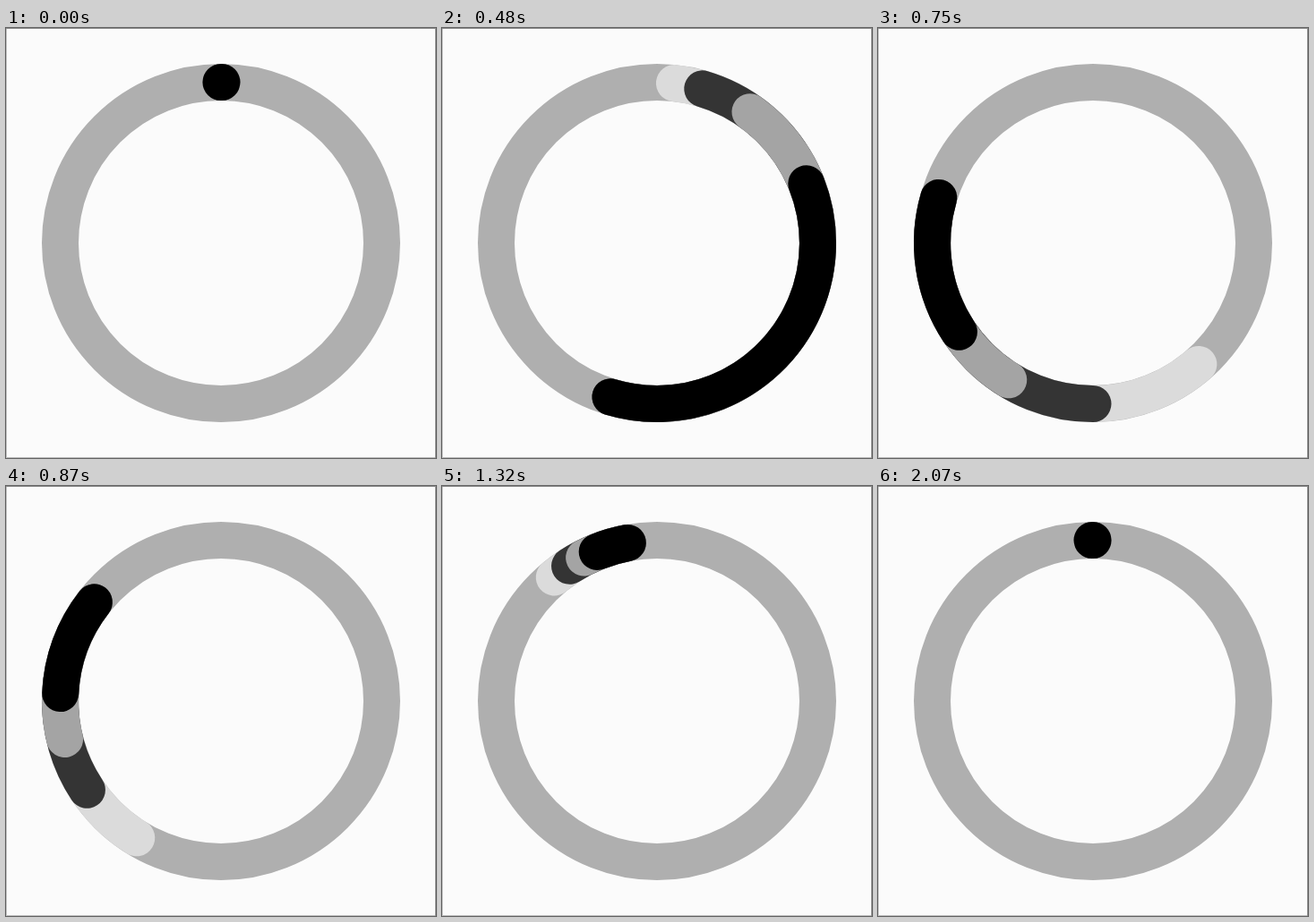
Write an HTML page with a canvas that moves like this. It is 480 by 480 pixels and loops after 2160 ms.

```html
<!DOCTYPE html>
<html>
<head>
<meta charset="utf-8">
<style>
  html, body { margin: 0; width: 100%; height: 100%; overflow: hidden; background: #fbfbfb; }
  canvas { display: block; }
</style>
</head>
<body>
<canvas width="480" height="480"></canvas>
<script>
const ctx = document.querySelector('canvas').getContext('2d');
const LOOP = 2160, STEP = 30, SWEEP = 1800;
const MIN_ARC = 0.3; // degrees, keeps the resting dot visible

// Tail colours and how far each tail lags behind the shared head, in ms
const tails = [
  ['#dbdbdb', 360],
  ['#343434', 300],
  ['#a4a4a4', 240],
  ['#000', 180]
];

// cubic-bezier(1/3, 0, 0, 1), solved by bisection
function ease(x) {
  if (x <= 0) return 0;
  if (x >= 1) return 1;
  let lo = 0, hi = 1;
  for (let i = 0; i < 30; i++) {
    const s = (lo + hi) / 2;
    if (s * (2 * s * s - 2 * s + 1) < x) lo = s; else hi = s;
  }
  return lo * lo * (3 - 2 * lo);
}

const angle = ms => 360 * ease(ms / SWEEP);

function arc(color, from, to) {
  const rad = deg => (deg - 90) * Math.PI / 180;
  ctx.strokeStyle = color;
  ctx.beginPath();
  ctx.arc(240, 240, 179.5, rad(from), rad(to));
  ctx.stroke();
}

function border(color, x, y, w, h) {
  ctx.fillStyle = color;
  ctx.fillRect(x, y, w, h);
}

function draw(now) {
  const t = Math.min(Math.floor(now % LOOP / STEP) * STEP, LOOP - 3 * STEP);
  border('#fbfbfb', 0, 0, 480, 480);
  border('#bdbdbd', 0, 0, 1, 480);
  border('#bdbdbd', 0, 479, 480, 1);
  border('#8c8c8c', 479, 0, 1, 480);
  border('#8c8c8c', 0, 0, 480, 1);

  ctx.lineWidth = 41;
  ctx.lineCap = 'round';
  arc('#afafaf', 0, 360);
  const head = Math.max(angle(t), MIN_ARC);
  for (const [color, lag] of tails)
    arc(color, Math.min(angle(t - lag), 360 - MIN_ARC), head);
}

const start = performance.now();
function frame() {
  draw(performance.now() - start);
  requestAnimationFrame(frame);
}
frame();
</script>
</body>
</html>
```
